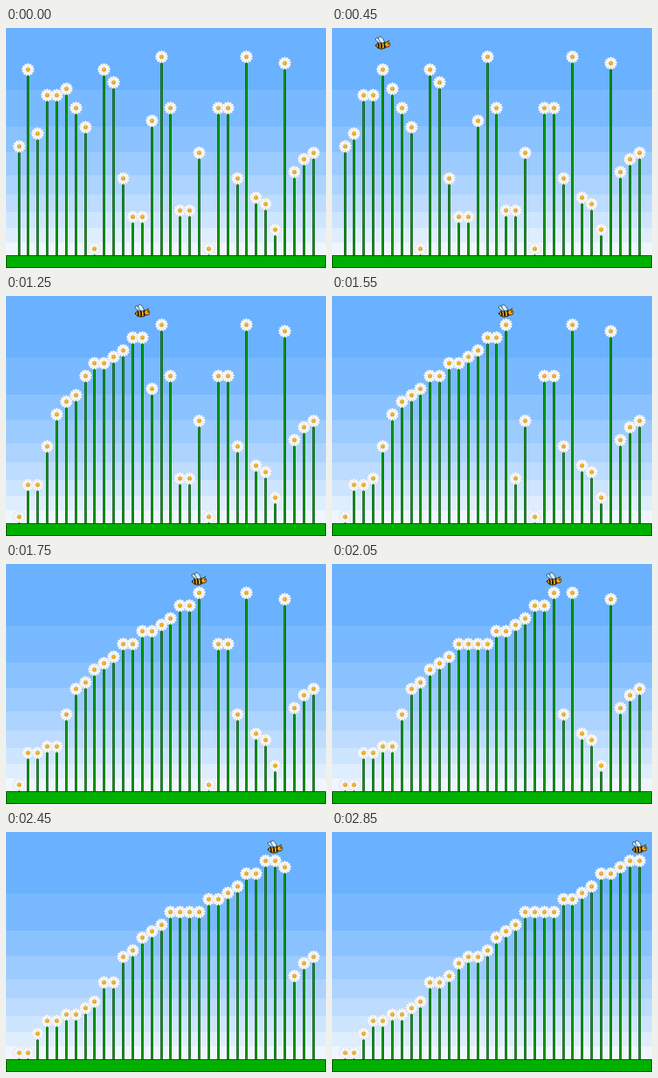
Write an HTML page that moves like this. It is 400x300 px and loops after 2.95 s.

```html
<!DOCTYPE html>
<html lang="en">
<head>
<meta charset="utf-8">
<title>Flower sort</title>
<style>
html, body { margin: 0; width: 100%; height: 100%; overflow: hidden; }
svg { display: block; width: 400px; height: 300px; }
</style>
</head>
<body>
<svg viewBox="0 0 400 300" xmlns="http://www.w3.org/2000/svg">
  <defs>
    <g id="daisy"></g>
  </defs>
  <g id="sky" shape-rendering="crispEdges"></g>
  <g id="stems" shape-rendering="crispEdges"></g>
  <rect x=".5" y="284.5" width="399" height="15" fill="#00b000" stroke="#005000"/>
  <g id="heads"></g>
  <g id="bee">
    <path d="M-9.6 3 L-6 .8 L-6 4.4 Z" fill="#1c1408"/>
    <g transform="rotate(-4)">
      <ellipse cx="-1" cy="2.6" rx="7" ry="4.4" fill="#f2aa14" stroke="#1c1408" stroke-width=".9"/>
      <path d="M-5.4 0 Q-4.2 3 -5 5.8 M-1.9 -1 Q-.7 3 -1.6 6.4 M2.2 -.6 Q3.2 3 2.2 6" fill="none" stroke="#1c1408" stroke-width="2"/>
    </g>
    <circle cx="6.2" cy="1.6" r="3.3" fill="#f2aa14" stroke="#1c1408" stroke-width=".8"/>
    <circle cx="7.4" cy=".9" r=".8" fill="#1c1408"/>
    <path d="M6.4 -1.6 Q7.2 -3.6 8.8 -3.4" fill="none" stroke="#1c1408" stroke-width=".8"/>
    <ellipse cx="-4.8" cy="-3.4" rx="4.4" ry="2.2" transform="rotate(32 -4.8 -3.4)" fill="#c4e4f6" stroke="#25435c" stroke-width=".8"/>
    <ellipse cx="-1.4" cy="-4.2" rx="4.7" ry="2.5" transform="rotate(55 -1.4 -4.2)" fill="#d4eefa" stroke="#25435c" stroke-width=".8"/>
  </g>
</svg>
<script>
const NS = 'http://www.w3.org/2000/svg';
const $ = id => document.getElementById(id);

function add(parent, tag, attrs) {
  const el = document.createElementNS(NS, tag);
  for (const k in attrs) el.setAttribute(k, attrs[k]);
  return parent.appendChild(el);
}

const LOOP = 2950, HOLD = 250, STEP = 100;
const start = [16, 28, 18, 24, 24, 25, 22, 19, 0, 28, 26, 11, 5, 5, 20, 30,
               22, 6, 6, 15, 0, 22, 22, 11, 30, 8, 7, 3, 29, 12, 14, 15];
const colX = i => Math.floor(16 + i * 368 / 31) + 0.5;
const headY = v => 276 - 8 * v;

// Insertion sort; only insertions that move a flower make a step.
function sortSteps(list) {
  const steps = [{ list, at: -1 }];
  let cur = list.slice();
  for (let i = 1; i < cur.length; i++) {
    const v = cur[i];
    let j = i;
    while (j > 0 && cur[j - 1] > v) j--;
    if (j === i) continue;
    cur = cur.slice();
    cur.splice(i, 1);
    cur.splice(j, 0, v);
    steps.push({ list: cur, at: i });
  }
  return steps;
}

const bands = [0, 77, 123, 155, 184, 208, 230, 250, 268];
const tints = ['#6ab1ff', '#78b9ff', '#89c2ff', '#9bcbff', '#acd4ff',
               '#bddcff', '#cee5ff', '#dfeeff', '#eff6ff'];
bands.forEach((y, i) =>
  add($('sky'), 'rect', { x: 0, y, width: 400, height: 300 - y, fill: tints[i] }));

const daisy = $('daisy'), PETALS = 13;
add(daisy, 'circle', { r: 5.6, fill: '#dfe2e8' });
for (let i = 0; i < PETALS; i++) {
  add(daisy, 'ellipse', {
    cy: -5.1, rx: 1.55, ry: 3, fill: '#fff', stroke: '#b9bec8', 'stroke-width': 0.35,
    transform: `rotate(${i * 360 / PETALS})`
  });
}
add(daisy, 'circle', { r: 2.6, fill: '#e6a81c' });
add(daisy, 'circle', { cx: -0.4, cy: -0.5, r: 1.3, fill: '#f2bf3a' });

const plants = start.map((_, i) => {
  const x = colX(i);
  return {
    x,
    edge: add($('stems'), 'rect', { x: x - 1.5, width: 3, fill: '#005a00' }),
    core: add($('stems'), 'rect', { x: x - 0.5, width: 1, fill: '#00b41e' }),
    head: add($('heads'), 'use', { href: '#daisy' })
  };
});

const steps = sortSteps(start);
let shown = -1;

function draw(time) {
  const t = time % LOOP;
  const n = t < HOLD ? 0 : Math.min(steps.length - 1, 1 + Math.floor((t - HOLD) / STEP));
  if (n === shown) return;
  shown = n;
  const { list, at } = steps[n];
  plants.forEach((p, i) => {
    const y = headY(list[i]);
    for (const r of [p.edge, p.core]) {
      r.setAttribute('y', y + 4);
      r.setAttribute('height', 280 - y);
    }
    p.head.setAttribute('transform', `translate(${p.x} ${y})`);
  });
  $('bee').setAttribute('visibility', at < 0 ? 'hidden' : 'visible');
  if (at >= 0) $('bee').setAttribute('transform', `translate(${colX(at) - 0.5} 19)`);
}

function tick(now) {
  draw(now);
  requestAnimationFrame(tick);
}
draw(0);
requestAnimationFrame(tick);
</script>
</body>
</html>
```
